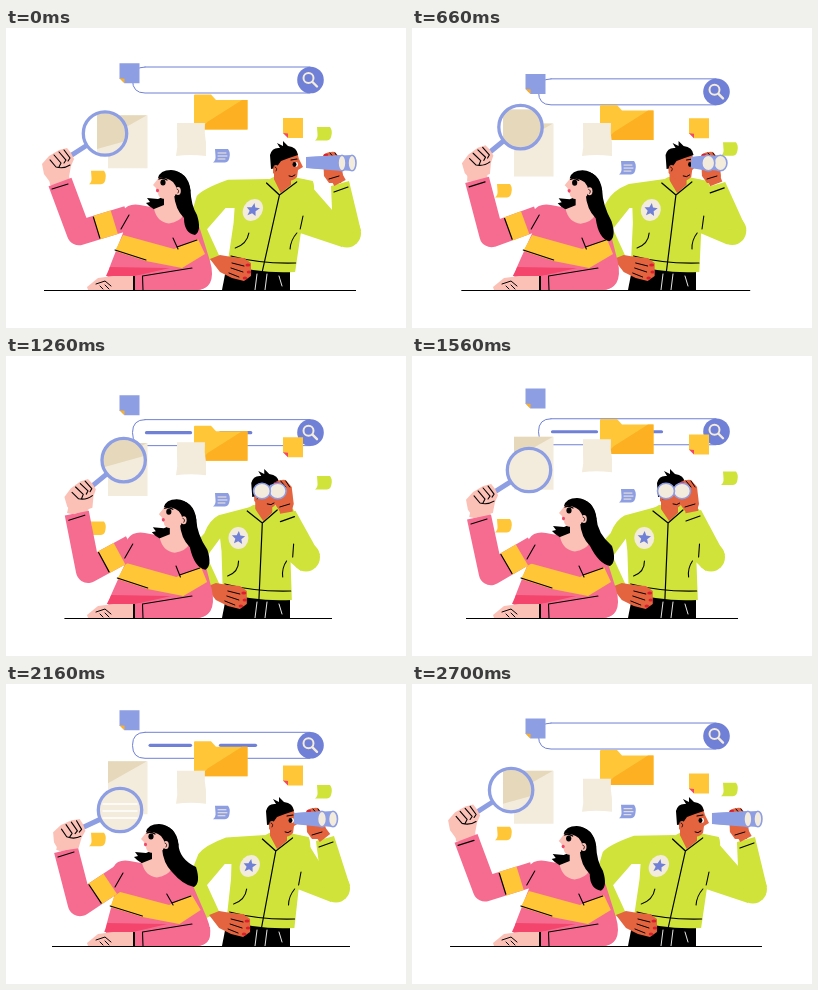
These frames come from a looping animation (400 by 300 pixels, 2.73 s). An HTML page with a canvas:

```html
<!DOCTYPE html>
<html lang="en">
<head>
<meta charset="utf-8">
<title>Search</title>
<style>
html, body { margin: 0; width: 100%; height: 100%; overflow: hidden; background: #fff; }
canvas { display: block; width: 400px; height: 300px; }
</style>
</head>
<body>
<canvas id="stage"></canvas>
<script>
const LOOP = 2730, STEP = 30;
const C = {
  pink: '#f66c90', red: '#f4466c', yellow: '#ffc738', orange: '#fdb022', skin: '#fcc1b6',
  blue: '#8e9ee3', deep: '#6f80d6', cream: '#f3ebdc', beige: '#e6d9bb',
  green: '#cfe33b', brown: '#e4643f', nail: '#dc1f2e', ink: '#000', white: '#fff'
};

const canvas = document.getElementById('stage');
const g = canvas.getContext('2d');
const dpr = window.devicePixelRatio || 1;
canvas.width = 400 * dpr;
canvas.height = 300 * dpr;

// Poses: six values per track, one for each key time.
const TIMES = [0, 420, 930, 1560, 1920, 2160, LOOP];
const TRACKS = {
  groundL: [38, 39, 61, 54, 47, 46], groundR: [350, 349, 326, 326, 326, 344],
  headX: [0, 2, 9, 0, -12, -12], headY: [0, -1, 2, 0, -2, -2],
  hairX: [193, 198, 204, 202, 194, 192], hairY: [207, 210, 216, 210, 204, 203],
  shoulderX: [122, 124, 128, 122, 116, 116], shoulderY: [190, 190, 190, 192, 192, 192],
  elbowX: [73, 75, 84, 79, 74, 74], elbowY: [205, 204, 212, 217, 221, 220],
  cuffX: [54, 57, 73, 67, 61, 60], cuffY: [154, 151, 154, 161, 167, 166],
  handX: [52, 55, 77, 70, 64, 63], handY: [136, 133, 136, 144, 151, 150],
  lensX: [99, 100, 118, 117, 115, 114], lensY: [105.5, 101, 98, 114, 127, 126],
  foldY: [116, 124, 124, 88, 76, 76], lineA: [0, 0, 0, 0, 1, 1],
  lean: [18, 15, 0, -1, 4, 14], profile: [1, 1, 0, 0, 0.35, 1],
  armX: [341, 336, 303, 299, 311, 330], armY: [205, 204, 201, 201, 202, 204],
  wristX: [334, 326, 282, 280, 295, 319], wristY: [156, 156, 158, 157, 156, 155],
  gripX: [327, 318, 280, 277, 290, 310],
  eyeX: [300, 295, 262, 260, 264, 288],
  lens1X: [336, 327, 262, 254, 275, 316], lens2X: [346, 337, 277, 270, 290, 327],
  lensW: [4, 5, 8, 8.5, 6.5, 4.5]
};

const N = 6;
const val = (v, i) => v[(i + N) % N];
const gap = i => TIMES[(i + N) % N + 1] - TIMES[(i + N) % N];
const rate = (v, i) => (val(v, i + 1) - val(v, i)) / gap(i);

function slope(v, i) {
  const a = rate(v, i - 1), b = rate(v, i);
  return a * b <= 0 ? 0 : 2 * a * b / (a + b);
}

function sample(v, t) {
  let i = 0;
  while (t >= TIMES[i + 1]) i++;
  const h = gap(i), u = (t - TIMES[i]) / h, w = 1 - u;
  return val(v, i) * w * w * (1 + 2 * u) + val(v, i + 1) * u * u * (3 - 2 * u) +
    h * u * w * (slope(v, i) * w - slope(v, i + 1) * u);
}

const bob = (t, mid, amp, peak) => mid + amp * Math.cos((t - peak) / LOOP * 2 * Math.PI);
const ramp = (t, a, b) => Math.min(1, Math.max(0, (t - a) / (b - a)));

function fill(d, color) {
  g.fillStyle = color;
  g.fill(new Path2D(d));
}

function line(d, w = 1.2, color = C.ink, cap = 'round') {
  g.lineWidth = w;
  g.strokeStyle = color;
  g.lineCap = cap;
  g.lineJoin = 'round';
  g.stroke(new Path2D(d));
}

function oval(x, y, rx, ry, color, rim, w) {
  g.beginPath();
  g.ellipse(x, y, rx, ry, 0, 0, 7);
  if (color) { g.fillStyle = color; g.fill(); }
  if (rim) { g.lineWidth = w; g.strokeStyle = rim; g.stroke(); }
}

function group(x, y, draw, angle = 0) {
  g.save();
  g.translate(x, y);
  g.rotate(angle);
  draw();
  g.restore();
}

// Slants a body sideways while its base stays on the ground.
function leaning(dx, height, draw) {
  g.save();
  g.transform(1, 0, -dx / height, 1, dx * 262 / height, 0);
  draw();
  g.restore();
}

function note(x, y, color, fold) {
  group(x, y, () => {
    fill('M0 0H20V20H5L0 15Z', color);
    fill('M0 15L5 15.500V20Z', fold);
  });
}

function bubble(x, y, color) {
  group(x, y, () => fill('M2 0H15Q17.500 3 16.500 8Q16 13 12 13.500H0Q3 11 2.500 7Z', color));
}

function searchBar(t) {
  group(0, bob(t, 64.5, 12.5, 1365), () => {
    line('M139 -13H304M304 13H139Q126.500 13 126.500 0Q126.500 -13 139 -13', 1, C.deep);
    const dash = (a, b, on, off) => {
      const from = a + (b - a) * ramp(t, off, off + 260);
      const to = a + (b - a) * ramp(t, on, on + 240);
      if (to - from > 1) line(`M${from + 1.5} 0H${Math.max(from + 1.5, to - 1.5)}`, 3.2, C.deep);
    };
    dash(139, 186, 720, 2140);
    dash(213, 251, 1050, 2380);
    oval(304.5, 0, 13.3, 13.3, C.deep);
    oval(302.5, -2, 5, 5, null, C.cream, 2);
    line('M306.500 2L311 6.500', 2.4, C.cream);
  });
}

function floaters(t) {
  note(113.5, bob(t, 36, 10, 720), C.blue, C.orange);
  group(102, bob(t, 86, 9.5, 620), () => {
    fill('M0 0H39.500V53H0Z', C.cream);
    fill('M0 0H39L0 22Z', C.beige);
  });
  group(188, bob(t, 67, 10, 700), () => {
    fill('M0 1Q0 0 1 0H17L22 5.500H53.500V35H1Q0 35 0 34Z', C.yellow);
    fill('M6 35L14 27L48 5.500H53.500V35Z', C.orange);
  });
  group(170, bob(t, 90, 7, 330), () =>
    fill('M1 0H29Q28 10 30 20V33Q14 31 0 33Q2 24 1 14Z', C.cream));
  note(277, bob(t, 85, 7, 340), C.yellow, C.red);
  bubble(309, bob(t, 109, 11.5, 1140), C.green);
  group(0, bob(t, 128.5, 9, 1110), () => {
    bubble(207, 0, C.blue);
    line('M212 4H220M212 7H221M212 10H219', 1, C.cream);
  });
  bubble(83, bob(t, 154, 11.5, 1270), C.yellow);
}

function star(x, y, r) {
  let d = '';
  for (let i = 0; i < 10; i++) {
    const a = i * Math.PI / 5 - 1.5, k = i % 2 ? r * 0.45 : r;
    d += `${i ? 'L' : 'M'}${x + k * Math.cos(a)} ${y + k * Math.sin(a)}`;
  }
  fill(d + 'Z', C.deep);
}

function manHead(p) {
  const k = p.profile;
  fill('M250 142L250 158L258 168L267 157V146Z', C.brown);
  fill(`M249 124H${271 + 2 * k}L${272 + 3 * k} 131L${272 + 7 * k} 139L${271 + 3 * k} 142L${270 + 3 * k} 149
    Q${264 + 4 * k} 155 257 152L249 145Z`, C.brown);
  fill('M247 141L246 127Q248 119 256 120L253 115L259 118L259 113L264 118Q273 119 274 127L265 130L257 133L252 140Z', C.ink);
  oval(252, 141, 2.8, 4, C.brown);
  line('M251 139Q254 140 252 143', 0.8);
  line(`M${262 + 3 * k} 148Q${266 + 2 * k} 150 ${269 + 2 * k} 147`, 1);
  if (k > 0.3) {
    oval(272, 136.5, 2, 2.4, C.white);
    oval(270.5, 136.5, 2, 2.4, C.ink);
    line('M267 132L273 131', 1.2);
  }
}

function binoculars(p) {
  const barrel = x => {
    const e = p.eyeX + (x - p.lens1X) * 0.2;
    fill(`M${e} 129L${x} 127V143L${e} 140Z`, C.blue);
    oval(x, 135, p.lensW, 7.8, C.cream, C.blue, 1.6);
  };
  barrel(p.lens2X);
  barrel(p.lens1X);
}

function manSleeves(p) {
  const { lean, armX, armY, wristX, wristY } = p;
  line('M190 194L207 231', 14, C.green, 'butt');
  fill(`M${245 + lean} 151L${213 + lean / 2} ${159 - lean * 0.4}Q${203 - lean * 0.3} ${164 - lean * 0.2} ${198 - lean * 0.4} ${177 - lean / 2}
    L183 194L196 207L${216 + lean * 0.2} 180L${240 + lean} 180Z`, C.green);
  fill(`M${272 + lean} 152Q${284 + lean} 150 ${288 + lean * 0.8} 155L${armX - 14} ${armY - 22}L${armX} ${armY}
    L${armX - 5} ${armY + 14}L${282 + lean * 0.5} 204Z`, C.green);
  oval(armX, armY, 14, 14.5, C.green);
  fill(`M${wristX - 9} ${wristY + 2}L${wristX + 9} ${wristY - 3}L${armX + 14} ${armY - 2}L${armX - 14} ${armY}Z`, C.green);
}

function man(p) {
  const { lean, wristX, wristY } = p;
  fill('M221 236L216 262H284V240Z', C.ink);
  line('M251 246L249 262M261 246L259 262M273 248L276 258', 0.9, C.white);
  manSleeves(p);
  leaning(lean, 104, () =>
    fill('M214 176L216 160L243 152L248 149H268L288 153Q294 164 289 184L285 206L286 244Q250 246 217 236L216 195Z', C.green));
  group(lean, 0, () => manHead(p));
  leaning(lean, 104, () => {
    fill('M241 153L248 150L258 165L270 154L275 153L264 169L257 171Z', C.green);
    line('M242 155L257 167L272 154M257 167L253 245', 1.2);
    line('M233 205Q233 216 222 220M281 205Q276 212 277 221', 1.1);
    line('M219 228Q250 236 285 235', 1.1);
    oval(233, 182, 10, 11, C.cream);
    star(233, 182, 7);
  });
  line(`M${288 + lean * 0.5} 188L${287 + lean * 0.4} 201`, 1.1);
  line(`M${wristX - 6} ${wristY + 8}L${wristX + 8} ${wristY + 3}`, 1.2);

  line(`M${p.gripX} 142L${wristX} ${wristY - 1}`, 13, C.brown, 'butt');
  group(p.gripX, 138, () => {
    fill('M-10 -11Q-4 -15 2 -14L8 -7L10 10L8 17L-4 17L-9 10Z', C.brown);
    line('M-3 -13L2 -7M2 -13L6 -7', 1);
    oval(-7, -11, 2.2, 1.5, C.nail);
    line('M-4 13L6 10', 1);
  });
  binoculars(p);

  group(lean * 0.22, -2, () => {
    fill('M200 233L210 229L222 231L234 232L241 237L241 250L234 255L222 252L210 246Z', C.brown);
    line('M222 237L234 240M221 242L233 246M219 247L229 251', 1);
    oval(238, 239, 2.5, 1.6, C.nail);
    oval(239, 246, 2.3, 1.6, C.nail);
    oval(235, 252, 2.3, 1.6, C.nail);
  });
}

function womanHead(p) {
  const ex = p.hairX - p.headX, ey = p.hairY - p.headY;
  group(p.headX, p.headY, () => {
    fill('M164 166L152 171L141 170L144 174L140 175Q146 182 158 185L168 180Z', C.ink);
    fill('M158 166L158 177L148 181Q151 194 163 195.500Q174 194 178 186L173 167Z', C.skin);
    fill(`M164 142.500Q182 143 184.500 162Q185 177 ${ex - 2} ${ey - 20}Q${ex + 3} ${ey - 4} ${ex - 4} ${ey}
      Q${ex - 15} ${ey - 2} 178 190Q169 181 168 166Z`, C.ink);
    fill('M154 147L151 152L147 157L150 160L150 163L152 165Q152 170.500 159 171L169 168L174 160L170 147Z', C.skin);
    fill('M152 150Q154 142 165 142Q181 143 184.500 163L177 173L169 168Q173 161 167 154Q160 149 152 150Z', C.ink);
    oval(172, 163, 2.8, 4, C.skin);
    line('M171 161Q174 162 172 165', 0.8);
    oval(157, 154.5, 2.6, 3, C.ink);
    line('M153 151Q156 149 161 152', 1.4);
    oval(151.5, 162.5, 1.5, 1.8, C.red);
  });
}

function magnifier(p, t) {
  const x = p.lensX, y = p.lensY;
  const a = Math.atan2(y - p.handY, x - p.handX);
  const at = r => `${x - r * Math.cos(a)} ${y - r * Math.sin(a)}`;
  line(`M${at(22)}L${at(50)}`, 5, C.blue);
  g.save();
  g.beginPath();
  g.arc(x, y, 21, 0, 7);
  g.clip();
  fill('M0 0H400V300H0Z', C.white);
  const top = bob(t, 72, 9.5, 620);
  fill(`M91 ${top}H152V${top + 83}H91Z`, C.cream);
  fill(`M91 ${top}H152V${p.foldY - 12}L91 ${p.foldY + 5}Z`, C.beige);
  g.globalAlpha = Math.max(0, p.lineA);
  line(`M97 ${y - 6}H131M97 ${y + 1}H131M97 ${y + 8}H131`, 1.4, C.white);
  g.restore();
  oval(x, y, 21.7, 21.7, null, C.blue, 3.3);
  return a;
}

function woman(p, t) {
  const mix = k => [p.elbowX + (p.shoulderX - p.elbowX) * k, p.elbowY + (p.shoulderY - p.elbowY) * k];
  const [ax, ay] = mix(0.36), [bx, by] = mix(0.72);
  const len = Math.hypot(bx - ax, by - ay);
  const nx = -(by - ay) / len * 11, ny = (bx - ax) / len * 11;

  leaning(p.headX, 100, () => {
    fill('M117 183Q122 175 134 177L145 179Q160 190 178 185Q190 188 194 201L204 233Q208 247 204 255Q200 262 190 262H101Q100 246 106 233L117 205Z', C.pink);
    fill('M117 207L168 221L192 211L199 226L176 240L140 233L109 223Z', C.yellow);
    fill('M104 239L164 240L129 248H100Z', C.red);
    line('M109 222L140 232M167 210L172 221M171 219L191 212', 1.1);
  });

  line(`M${p.handX} ${p.handY + 4}L${p.cuffX} ${p.cuffY + 2}`, 20, C.skin, 'butt');
  line(`M${p.cuffX} ${p.cuffY}L${p.elbowX} ${p.elbowY}L${p.shoulderX} ${p.shoulderY}`, 24.5, C.pink, 'butt');
  line(`M${ax} ${ay}L${bx} ${by}`, 24.5, C.yellow, 'butt');
  line(`M${ax - nx} ${ay - ny}L${ax + nx} ${ay + ny}`, 1.2);
  line(`M${p.shoulderX + 1} ${p.shoulderY - 3}L${p.shoulderX - 7} ${p.shoulderY + 11}`, 1.1);
  line(`M${p.cuffX - 8} ${p.cuffY + 7}L${p.cuffX + 8} ${p.cuffY + 2}`, 1.2);

  womanHead(p);

  fill('M128 248L186 240L204 243Q206 262 190 262H128Z', C.pink);
  fill('M128 248L107 248L92 250L81 259L82 262H128Z', C.skin);
  line('M128 248V262', 2, C.ink, 'butt');
  line('M137 262L136.500 248L186 240', 1.1);
  line('M90 256L99 253L105 258M99 257L103 261M94 258L97 261', 1);

  const a = magnifier(p, t);
  group(p.handX, p.handY, () => {
    fill('M-8 18L-14 10L-16 0L-9 -8L1 -14L9 -16L13 -11L16 -5L13 2L11 13Z', C.skin);
    line('M1 -12L8 -4L6 -1M6 -14L12 -6L10 -3M-4 -9L3 -1L1 3M-8 -4L-2 3Q6 5 12 1', 1.1);
  }, (a + 0.58) * 0.8);
}

function draw(t) {
  const p = {};
  for (const k in TRACKS) p[k] = sample(TRACKS[k], t);
  g.setTransform(dpr, 0, 0, dpr, 0, 0);
  fill('M0 0H400V300H0Z', C.white);
  searchBar(t);
  floaters(t);
  man(p);
  woman(p, t);
  line(`M${p.groundL} 262.500H${p.groundR}`, 1, C.ink, 'butt');
}

const start = performance.now();
function tick() {
  const t = (performance.now() - start) % LOOP;
  draw(Math.floor(t / STEP) * STEP);
  requestAnimationFrame(tick);
}
tick();
</script>
</body>
</html>
```
